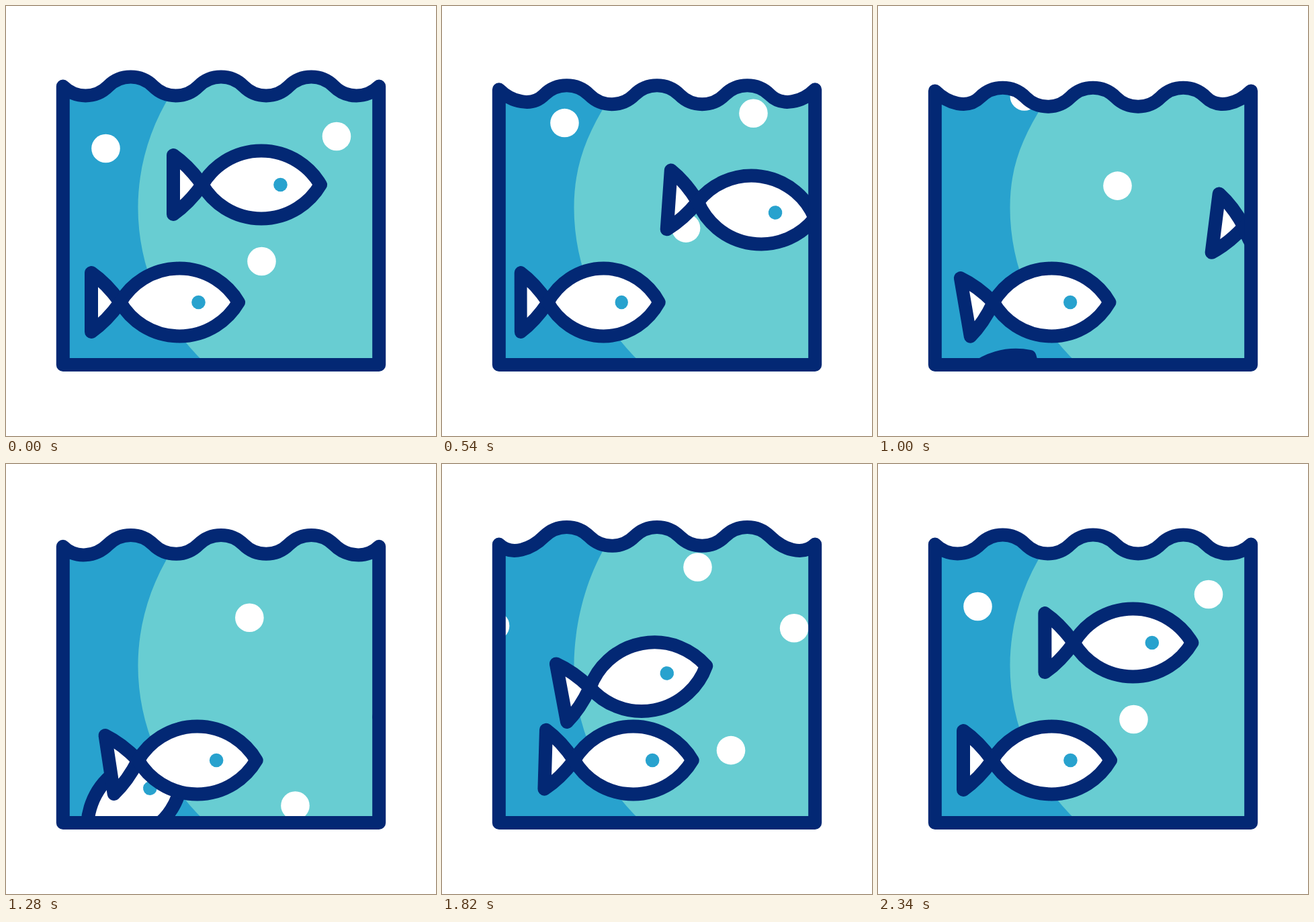
Write an HTML page that moves like this. It is 640x640 px and loops after 2400 ms.

```html
<!DOCTYPE html>
<html lang="en">
<head>
<meta charset="utf-8">
<title>Fish tank</title>
<style>
  html, body { margin: 0; width: 100%; height: 100%; overflow: hidden; background: #fff; }
  svg { display: block; width: 100vw; height: 100vh; }
  .line { stroke: #032874; stroke-width: 20; stroke-linejoin: round; stroke-linecap: round; }
  .white { fill: #fff; }
  .blue { fill: #28a2ce; }
  .teal { fill: #68cdd2; }
</style>
</head>
<body>
<svg viewBox="0 0 640 640">
  <defs>
    <clipPath id="inside"><path class="tank"/></clipPath>
  </defs>
  <g clip-path="url(#inside)">
    <path class="tank blue"/>
    <path id="light" class="teal"/>
    <g id="bubbles"></g>
    <g id="fishes"></g>
  </g>
  <path class="tank line" fill="none"/>
</svg>
<script>
const LOOP = 2400, START = 100, STOP = 2300;
const NS = 'http://www.w3.org/2000/svg';
const $ = id => document.getElementById(id);
const tanks = document.querySelectorAll('.tank');

// Sine ease from 0 to 1 between times a and b
function ease(t, a, b) {
  const p = Math.min(1, Math.max(0, (t - a) / (b - a)));
  return Math.sin(p * Math.PI / 2) ** 2;
}

// Time since leaving the rest pose, and time until reaching it again
const since = t => Math.max(0, t - START);
const until = t => Math.max(0, STOP - t);

// Distance at unit speed with a soft start
const soft = (t, lag) => since(t) ** 2 / (since(t) + lag || 1);

function add(parent, tag, attrs = {}) {
  const el = document.createElementNS(NS, tag);
  for (const k in attrs) el.setAttribute(k, attrs[k]);
  return parent.appendChild(el);
}

function drawTank(t) {
  const swell = ease(t, 200, 800), sink = ease(t, 790, 1680);
  const lift = 21 * swell - 35.5 * sink + 14.5 * ease(t, 1680, 2160);
  const ends = 8 * (swell - sink);
  const x0 = 84.8, y0 = 119.5, w = 67.2, c = 18.6, n = 7;
  const nodeY = i => y0 + (i % n ? lift : ends);

  let path = `M${x0},534V${nodeY(0)}`;
  for (let i = 0; i < n; i++) {
    const x = x0 + i * w, s = i % 2 ? -c : c;
    path += `C${x + c},${nodeY(i) + s} ${x + w - c},${nodeY(i + 1) + s} ${x + w},${nodeY(i + 1)}`;
  }
  tanks.forEach(el => el.setAttribute('d', path + 'V534Z'));
  $('light').setAttribute('d',
    `M246,${130 + lift}C214,${181 + lift} 196.5,240 196.5,300A319,319 0 0 0 298.7,534H560V60H246Z`);
}

// Three bubbles rise away while three others drift in to take their places
const bubbles = [
  t => [148.5 + 0.077 * since(t), 212 - 0.086 * since(t)],
  t => [148.5 - 0.145 * until(t), 212 + 0.06 * until(t)],
  t => [492 - 0.094 * soft(t, 200), 194 - 0.113 * soft(t, 200)],
  t => [492 + 0.00014 * until(t) ** 2, 194 + 0.105 * until(t)],
  t => [380.5 - 24 * (ease(t, START, 780) - ease(t, 1100, 1650)), 380 - 0.14 * soft(t, 110)],
  t => [430.5 + 10 * ease(t, 1280, 1620) - 60 * ease(t, 1640, STOP),
    380 + 0.07 * until(t) + 0.000055 * until(t) ** 2]
].map(at => ({ at, el: add($('bubbles'), 'circle', { r: 21.3, class: 'white' }) }));

function swimAway(t) {
  const e = ease(t, 70, 1400), angle = e * (34 - 20 * e);
  return { x: 380 + 315 * e, y: 266 + e * (150 - 55 * e), angle, wag: -angle / 2 };
}

function swimIn(t) {
  const dx = 213.5 * (1 - ease(t, 962, 2390));
  const dy = 370 * (1 - ease(t, 630, 2200));
  return { x: 380 - dx, y: 266 + dy, angle: -0.075 * dx - 0.1 * dy };
}

function hover(t) {
  const back = ease(t, 80, 640);
  return {
    x: 258 - 19 * back + 58.5 * ease(t, 640, 1570) - 39.5 * ease(t, 1570, 2220),
    y: 441,
    wag: -11 * ease(t, 500, 1130) + 13.8 * ease(t, 1130, 1680) - 2.8 * ease(t, 1680, 2000),
    stretch: 1 - 0.064 * (back - ease(t, 640, 1200))
  };
}

const fishes = [swimAway, swimIn, hover].map(pose => {
  const el = add($('fishes'), 'g');
  const tail = add(el, 'path', { class: 'white line', d: 'M0,0Q-20,-28 -43,-44V44Q-20,28 0,0Z' });
  add(el, 'path', { class: 'white line', d: 'M-88,0A102,102 0 0 1 88,0A102,102 0 0 1 -88,0Z' });
  add(el, 'circle', { class: 'blue', cx: 28.5, r: 10.3 });
  return { pose, el, tail };
});

function draw(t) {
  drawTank(t);
  for (const { at, el } of bubbles) {
    const [x, y] = at(t);
    el.setAttribute('cx', x);
    el.setAttribute('cy', y);
  }
  for (const { pose, el, tail } of fishes) {
    const { x, y, angle = 0, wag = 0, stretch = 1 } = pose(t);
    el.setAttribute('transform', `translate(${x} ${y}) rotate(${angle}) scale(${stretch} 1)`);
    tail.setAttribute('transform', `translate(-88 0) rotate(${wag})`);
  }
}

const start = performance.now();
function tick() {
  draw((performance.now() - start) % LOOP);
  requestAnimationFrame(tick);
}
tick();
</script>
</body>
</html>
```
